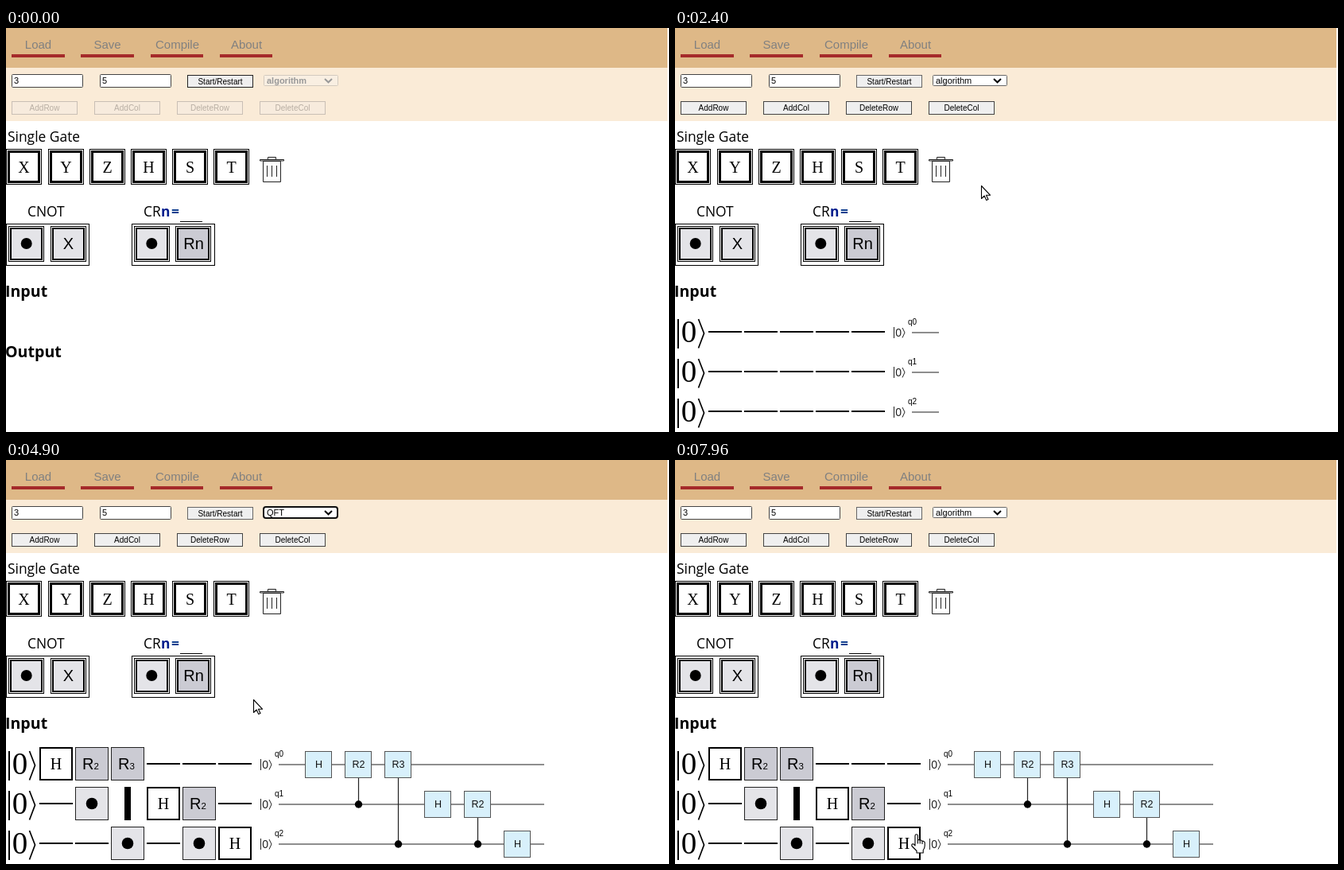
Animation, 834 px wide and 508 px high, one loop 8 s. Source, as an HTML page with a canvas:

```html
<!DOCTYPE html>
<html lang="en">
<head>
<meta charset="utf-8">
<title>Circuit editor</title>
<style>
html, body { margin: 0; width: 100%; height: 100%; overflow: hidden; background: #fff; }
canvas { display: block; }
</style>
</head>
<body>
<canvas id="stage" width="834" height="508"></canvas>
<script>
const g = document.getElementById('stage').getContext('2d');
const LOOP = 8000, STEP = 70;
const SANS = '"Liberation Sans", Arial, sans-serif';
const SERIF = '"Liberation Serif", "Times New Roman", serif';
const UI = '"Open Sans", "Noto Sans", sans-serif';
const DARK = '#cbcbd3', LIGHT = '#e4e4e8';

// start, end, target x, target y, sideways bend
const moves = [
  [190, 960, 286, 73, 0],
  [1030, 1030, 286, 72, 0],
  [1440, 2000, 395, 234, 0],
  [2130, 2890, 356, 97, 0],
  [2960, 3310, 372, 66, 0],
  [3650, 3930, 371, 107, 0],
  [4480, 5040, 302, 329, 0],
  [5240, 6000, 293, 483, -14],
  [6200, 6740, 290, 431, 0],
  [6940, 7010, 291, 439, 0],
  [7340, 7760, 292, 470, 0],
  [7960, 7960, 303, 470, 0]
];
const clicks = [[1230, 1370], [3380, 3450], [4280, 4410], [6130, 6200], [7270, 7340]];
const items = ['algorithm', 'Superposition', 'QFT', 'Bell State', 'GHZ State'];

function text(s, x, y, size, o = {}) {
  g.font = `${o.weight || 400} ${size}px ${o.font || SANS}`;
  g.textAlign = o.align || 'left';
  g.fillStyle = o.color || '#000';
  g.fillText(s, x, y);
}
function fill(x, y, w, h, color) {
  g.fillStyle = color;
  g.fillRect(x, y, w, h);
}
function box(x, y, w, h, color, line = 1, edge = '#000') {
  fill(x, y, w, h, edge);
  fill(x + line, y + line, w - 2 * line, h - 2 * line, color);
}
function roundBox(x, y, w, h, color, edge, line = 1, r = 1) {
  g.beginPath();
  g.roundRect(x + line / 2, y + line / 2, w - line, h - line, r);
  g.fillStyle = color;
  g.fill();
  stroke(edge, line);
}
function stroke(color, line) {
  g.strokeStyle = color;
  g.lineWidth = line;
  g.stroke();
}
function poly(points, color, line) {
  g.beginPath();
  points.forEach(p => g.lineTo(p[0], p[1]));
  stroke(color, line);
}
function dot(x, y, r, color = '#000') {
  g.beginPath();
  g.arc(x, y, r, 0, Math.PI * 2);
  g.fillStyle = color;
  g.fill();
}

function button(label, x, y, h, on, edge) {
  box(x, y, 83, h, on ? '#efefef' : '#f7ebdd', 1, on ? edge : '#c9bfb5');
  text(label, x + 41.5, y + 11.5, 10, { align: 'center', color: on ? '#000' : '#b8aea3' });
}

function header(on, value, focus) {
  fill(0, 0, 832, 50, '#deb887');
  fill(0, 50, 832, 67, '#faebd7');
  ['Load', 'Save', 'Compile', 'About'].forEach((s, i) => {
    const x = Math.round(7 + 87.4 * i);
    text(s, x + 33.5, 26, 15, { align: 'center', color: '#808080' });
    fill(x, 33, i < 2 ? 67 : 66, 4, '#a52a2a');
  });
  [[7, '3'], [118, '5']].forEach(([x, s]) => {
    roundBox(x, 58, 90, 17, '#fff', '#444');
    text(s, x + 3, 70, 11);
  });
  button('Start/Restart', 228, 59, 16, true, on ? '#666' : '#222');
  ['AddRow', 'AddCol', 'DeleteRow', 'DeleteCol'].forEach((s, i) => button(s, 7 + 104 * i, 92, 17, on, '#444'));
  if (focus) roundBox(323, 58, 95, 16, '#fff', '#101010', 2, 3);
  else roundBox(324, 59, 94, 14, on ? '#fff' : '#f9efe2', on ? '#666' : '#d3cabf');
  const ink = on ? '#000' : '#999';
  text(value, 328, 70, 11, { color: ink, weight: on ? 400 : 700 });
  poly([[401, 64], [405.5, 68.3], [410, 64]], ink, 2);
}

function palette() {
  text('Single Gate', 2, 143, 17.4, { font: UI });
  [...'XYZHST'].forEach((s, i) => {
    const x = Math.round(52.15 * i + 0.4);
    box(x, 152, 45, 45, '#fff');
    box(x + 2, 154, 41, 41, '#fff', 3);
    text(s, x + 22.5, 182, 20, { font: SERIF, align: 'center' });
  });
  g.beginPath();
  g.rect(319.5, 165.5, 30, 1.5);
  g.rect(329.5, 162.5, 10, 3);
  g.rect(323.5, 167.5, 22, 26);
  for (const x of [328.5, 334.5, 340.5]) {
    g.moveTo(x, 173);
    g.lineTo(x, 187);
  }
  stroke('#222', 1);

  text('CNOT', 27, 237, 17.4, { font: UI });
  text('CR', 173, 237, 17.4, { font: UI });
  text('n', 195, 237, 17.4, { font: UI, weight: 700, color: '#001c8c' });
  text('=', 208, 237, 17.4, { font: UI, weight: 700, color: '#0a3a8c' });
  fill(219, 243, 28, 1, '#000');
  [[0, 'X', LIGHT], [157.6, 'Rn', DARK]].forEach(([x, s, color]) => {
    box(Math.round(x), 246, 105, 53, '#fff');
    [[3.4, LIGHT], [55.6, color]].forEach(([d, c]) => {
      const left = Math.round(x + d);
      box(left, 249, 45, 45, '#fff');
      box(left + 2, 251, 41, 41, c, 2);
    });
    dot(x + 25.7, 271, 7);
    text(s, x + 78.4, 278, 20, { align: 'center' });
  });
}

function ket(y) {
  fill(3, y - 16, 2, 37, '#000');
  text('0', 17.5, y + 13, 39, { font: SERIF, align: 'center' });
  poly([[29.5, y - 16], [36.5, y + 2], [29.5, y + 20.5]], '#000', 1.7);
}

function cell(kind, col, y) {
  const x = 42 + 45 * col, top = y - 21, mid = x + 21;
  if (kind === '-') fill(x, y - 1, 42, 2, '#000');
  else if (kind === '|') fill(x + 17, top, 8, 42, '#000');
  else if (kind === 'H') {
    box(x, top, 42, 42, '#fff', 2);
    text('H', mid, y + 7, 20, { font: SERIF, align: 'center' });
  } else if (kind === 'o') {
    box(x, top, 42, 42, LIGHT, 1, '#222');
    dot(mid, y, 7.3);
  } else {
    box(x, top, 42, 42, DARK, 1, '#222');
    text('R', x + 9, y + 7, 20);
    text(kind, x + 23.5, y + 7, 11.5);
  }
}

function schematic(rows, shift, long) {
  const ink = '#444';
  for (let r = 0; r < 3; r++) {
    const y = 383 + 50 * r, x = 274 + shift;
    fill(x + 1, y - 7, 1, 14, '#222');
    text('0', x + 7.2, y + 4.5, 14, { align: 'center', color: '#222' });
    poly([[x + 12, y - 6], [x + 15, y], [x + 12, y + 6.5]], '#222', 1);
    text('q' + r, x + 19, y - 10.4, 10);
    fill(x + 24, y - 0.6, long ? 334 : 34, 1.2, ink);
  }
  if (!long) return;
  const gates = (kinds, draw) => rows.forEach((row, r) => [...row].forEach((k, c) => {
    if (kinds.includes(k)) draw(393 + 50 * c, 383 + 50 * r, k, r, c);
  }));
  gates('o', (x, y, k, r, c) => {
    let up = r - 1;
    while (!'23'.includes(rows[up][c])) up--;
    fill(x - 0.1, 383 + 50 * up, 1.2, 50 * (r - up), '#222');
    dot(x + 0.5, y, 4.7);
  });
  gates('H23', (x, y, k) => {
    box(x - 17, y - 17, 34, 34, '#d8f0fb', 1, '#555');
    text(k === 'H' ? k : 'R' + k, x + 0.5, y + 3.5, 12.5, { align: 'center', color: '#111' });
  });
}

function menu(hot) {
  g.save();
  g.shadowColor = 'rgba(0,0,0,.45)';
  g.shadowBlur = 6;
  g.shadowOffsetY = 2;
  fill(325, 73, 93, 78, '#777');
  g.restore();
  fill(326, 74, 91, 76, '#fff');
  items.forEach((s, i) => {
    if (i === hot) fill(326, 74 + 15 * i, 91, 15, '#1e90ff');
    text(s, 329, 85 + 15 * i, 12, { color: i === hot ? '#fff' : '#000' });
  });
}

function pointerAt(t) {
  let x = 698, y = 488;
  for (const [a, b, tx, ty, bend] of moves) {
    if (t < a) break;
    const part = a === 190 ? 0 : STEP;
    const q = Math.min(b - a, Math.floor((t - a) / STEP) * STEP);
    const total = b - a + part;
    const u = total ? (q + part) / total : 1;
    const e = u * u * (3 - 2 * u);
    x += (tx - x) * e + bend * Math.sin(Math.PI * e);
    y += (ty - y) * e;
  }
  return [x, y];
}

const arrowShape = new Path2D('M.5 .5V16.5L4.2 13 6.7 18.6 9 17.6 6.5 12.2H11.5Z');
const handShape = new Path2D('M5 14V2.5Q5 .7 6.7 .7T8.4 2.5V8Q9.7 6.8 11 8.3 12.6 7.5 13.7 9.2 15.6 8.6 17.2 10.8V15Q17.2 18 15.2 20.5V24H7V21.5L1 15.5Q.2 13 2.3 12.8 3.8 12.8 5 15Z');
const fingers = new Path2D('M8.4 8V12.5M11.2 8.6V12.5M14 9.4V13');

function pointer(t) {
  const [x, y] = pointerAt(t);
  if (clicks.some(([a, b]) => t >= a && t < b)) dot(x, y, 15, 'rgba(245,240,60,.62)');
  const hand = (x > 228 && x < 311 && y > 58 && y < 76) || (x > 42 && x < 309 && y > 361);
  const shape = hand ? handShape : arrowShape;
  g.save();
  g.translate(Math.round(x) - (hand ? 6 : 0), Math.round(y));
  g.lineJoin = 'round';
  g.lineWidth = 1.1;
  g.strokeStyle = '#000';
  g.fillStyle = '#fff';
  g.fill(shape);
  g.stroke(shape);
  if (hand) g.stroke(fingers);
  g.restore();
}

function draw(t) {
  const on = t >= 1370, qft = t >= 4410;
  const moved = t >= 6600 && t < 7690;
  const redraw = (t >= 6600 && t < 6670) || (t >= 7690 && t < 7760);
  const focus = qft && t < 6600;
  fill(0, 0, 834, 508, '#fff');
  header(on, focus ? 'QFT' : 'algorithm', focus);
  palette();
  text('Input', -1, 338, 19.6, { font: UI, weight: 700 });
  if (!on) text('Output', -1, 414, 19.6, { font: UI, weight: 700 });
  else {
    const wire = t < 1440 ? '' : '-----';
    const rows = qft
      ? ['H23---', (redraw ? '-o-H2' : '-o|H2') + (moved ? 'H' : '-'), '--o-o' + (moved ? '-' : 'H')]
      : [wire, wire, wire];
    rows.forEach((row, r) => {
      const y = 382 + 50 * r;
      ket(y);
      [...row].forEach((k, c) => cell(k, c, y));
    });
    schematic(rows, qft ? 45 : 0, qft);
  }
  if (t >= 3450 && t < 4410) {
    const y = pointerAt(t)[1];
    menu(Math.max(0, Math.min(4, Math.floor((y - 74) / 15))));
  }
  if (t >= 190) pointer(t);
}

const begin = performance.now();
function frame() {
  draw((performance.now() - begin) % LOOP);
  requestAnimationFrame(frame);
}
frame();
</script>
</body>
</html>
```
